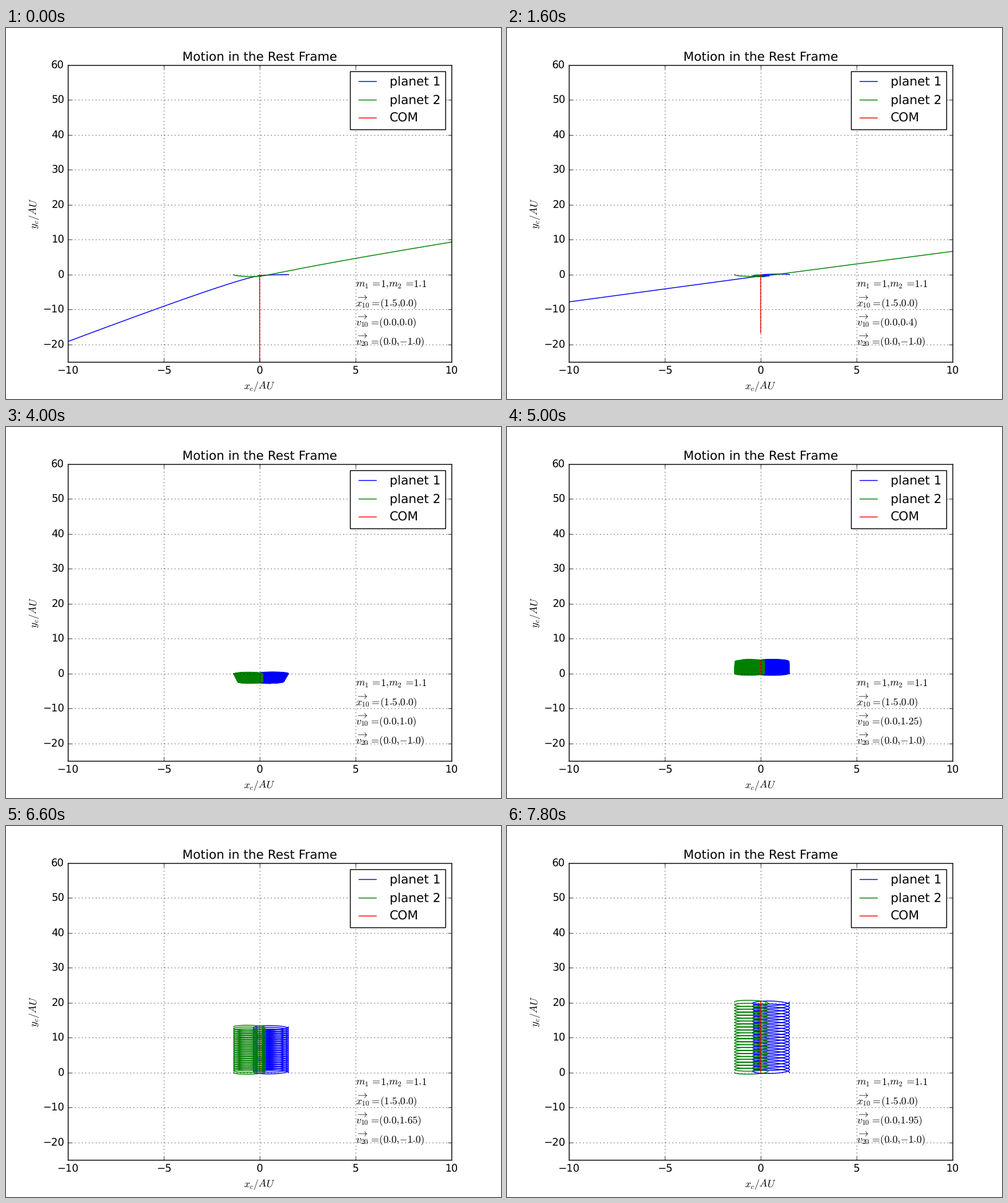
A matplotlib script that plays this animation: 800x600 px, repeating every 8 s.

```python
import numpy as np
import matplotlib.pyplot as plt
from matplotlib.animation import FuncAnimation

plt.style.use("classic")
plt.rcParams.update({"font.family": "DejaVu Sans", "text.hinting": "none"})

FRAMES, INTERVAL = 40, 200
M1, M2 = 1.0, 1.1
M = M1 + M2
X1, V2 = 1.5, -1.0
K = 56.4            # strength of the mutual attraction, AU^3 / yr^2
DT, STEPS = 0.01, 5000

speeds = np.round(0.05 * np.arange(FRAMES), 2)


def slope(state):
    z, w = state
    return np.array([w, -K * z / np.abs(z) ** 3])


def separation():
    """Runge-Kutta orbit of planet 1 about planet 2, for every start speed."""
    s = np.array([np.full(FRAMES, X1 * M / M2), 1j * (speeds - V2)])
    path = [s[0]]
    for _ in range(STEPS):
        a = slope(s)
        b = slope(s + a * DT / 2)
        c = slope(s + b * DT / 2)
        d = slope(s + c * DT)
        s = s + (a + 2 * b + 2 * c + d) * DT / 6
        path.append(s[0])
    return np.array(path)


rel = separation()
time = DT * np.arange(STEPS + 1)

fig = plt.figure(figsize=(8, 6), dpi=100, facecolor="white")
ax = fig.add_subplot()
ax.set(xlim=(-10, 10), ylim=(-25, 60))
ax.set_xticks(range(-10, 11, 5))
ax.set_yticks(range(-20, 61, 10))
ax.grid(True)
ax.set_title("Motion in the Rest Frame")
ax.set_xlabel("$x_c/AU$")
ax.set_ylabel("$y_c/AU$", labelpad=2.5)

names = {"planet 1": "b", "planet 2": "g", "COM": "r"}
lines = [ax.plot([], [], color, label=name)[0] for name, color in names.items()]
ax.legend(loc="upper right")


def vector(name, y, value=""):
    ax.text(5, y + 1.8, r"$\rightarrow$", fontsize=12)
    return ax.text(5, y, rf"${name}\hspace{{0.05}}=\!({value})$", fontsize=12)


def start_speed(i):
    return rf"$v_{{10}}\hspace{{0.05}}=\!(0.0{{,}}{speeds[i]})$"


ax.text(5, -3.5, r"$m_1\,=\!1{,}m_2\,=\!1.1$", fontsize=12)
vector("x_{10}", -9, "1.5{,}0.0")
label = vector("v_{10}", -14.5)
vector("v_{20}", -20, "0.0{,}{-}1.0")


def update(i):
    com = 1j * time * (M1 * speeds[i] + M2 * V2) / M
    paths = com + rel[:, i] * M2 / M, com - rel[:, i] * M1 / M, com
    for line, p in zip(lines, paths):
        line.set_data(p.real, p.imag)
    label.set_text(start_speed(i))
    return [*lines, label]


anim = FuncAnimation(fig, update, frames=FRAMES, interval=INTERVAL, repeat=True,
                     repeat_delay=0, blit=False)
plt.show()
```
